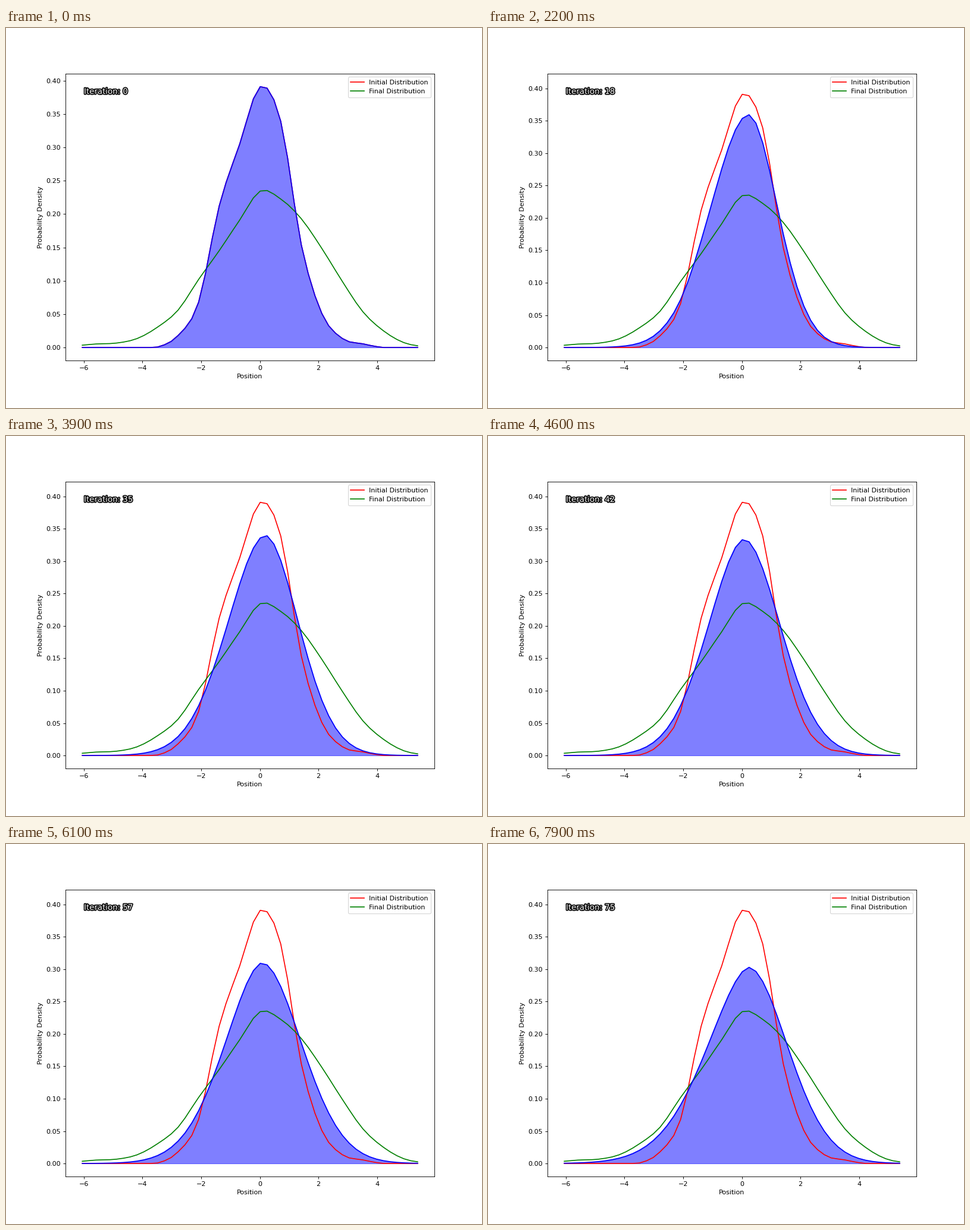
A matplotlib script that plays this animation: 800x640 px, repeating every 8000 ms.

```python
import numpy as np
import matplotlib.pyplot as plt
import matplotlib.patheffects as pe
from matplotlib.animation import FuncAnimation

N = 50
FRAMES, INTERVAL, HOLD = 80, 100, 4
X_MIN, X_MAX = -6.052, 5.381
x = np.linspace(X_MIN, X_MAX, N)


def smooth(points, first, gap=3):
    """Cubic curve through points (in thousandths) set every few grid steps."""
    p = np.pad(np.array(points) / 1000, 2, mode="edge")
    s = np.clip((np.arange(N) - first) / gap, 0, len(points) - 1)
    i = s.astype(int)
    t = s - i
    a, b, c, d = (p[i + k] for k in (1, 2, 3, 4))
    y = b + t / 2 * (c - a + t * (2 * a - 5 * b + 4 * c - d
                                  + t * (3 * (b - c) + d - a)))
    return np.maximum(y, 0)


initial = smooth([0, 0.7, 18, 68, 212, 305, 391, 339, 154, 51, 13.5, 5.5, 0], 8)
final = smooth([2.7, 5.2, 6.6, 13.3, 30.5, 56, 102, 145, 191, 234.5, 222.5,
                193, 148.5, 99, 53.5, 25, 7.2, 1.5], -1)

# How the spreading bell changes with the iteration count.
STEPS = [6, 18, 28, 42, 57, 75]
PEAK = [0.4108, 0.358, 0.346, 0.334, 0.310, 0.303]
CENTRE = [0.10, 0.24, 0.29, 0.08, 0.08, 0.24]
LEFT = [1.73, 1.84, 1.91, 1.76, 1.84, 2.08]
RIGHT = [1.38, 1.41, 1.49, 1.76, 1.91, 1.88]


def bell(n):
    peak, centre, left, right = (np.interp(n, STEPS, v)
                                 for v in (PEAK, CENTRE, LEFT, RIGHT))
    d = x - centre
    width = np.where(d < 0, left, right)
    power = np.where(d < 0, 2 - 0.004 * n, 1.88)
    return peak * np.exp(-(np.abs(d) / width) ** power)


def current(n):
    """The starting shape fades out while the bell takes over."""
    keep = np.exp(-n / 6)
    return keep * initial + (1 - keep) * bell(n)


# The y axis only ever grows to hold the highest peak so far.
curves = [current(n) for n in range(FRAMES - HOLD)]
tops = np.maximum.accumulate([c.max() for c in curves])

fig, ax = plt.subplots(figsize=(10, 8), dpi=80)
fig.subplots_adjust(left=0.125, right=0.9, bottom=0.125, top=0.88)
ax.plot(x, initial, color="red", label="Initial Distribution")
ax.plot(x, final, color="green", label="Final Distribution")
line, = ax.plot(x, initial, color="blue")
fill = ax.fill_between(x, initial, color="blue", alpha=0.5)
label = ax.text(0.05, 0.95, "", transform=ax.transAxes, fontsize=12,
                color="white", va="top",
                path_effects=[pe.withStroke(linewidth=3, foreground="black")])
ax.set_xlabel("Position")
ax.set_ylabel("Probability Density")
ax.legend(loc="upper right")
pad = 0.05 * (X_MAX - X_MIN)
ax.set_xlim(X_MIN - pad, X_MAX + pad)


def draw(frame):
    n = max(0, frame - HOLD)
    y, top = curves[n], tops[n]
    line.set_ydata(y)
    fill.set_verts([np.column_stack([np.r_[x, x[::-1]],
                                     np.r_[y, np.zeros(N)]])])
    ax.set_ylim(-0.05 * top, 1.05 * top)
    label.set_text(f"Iteration: {n}")
    return line, fill, label


anim = FuncAnimation(fig, draw, frames=FRAMES, interval=INTERVAL,
                     init_func=lambda: draw(0), repeat=True, repeat_delay=0)
plt.show()
```
